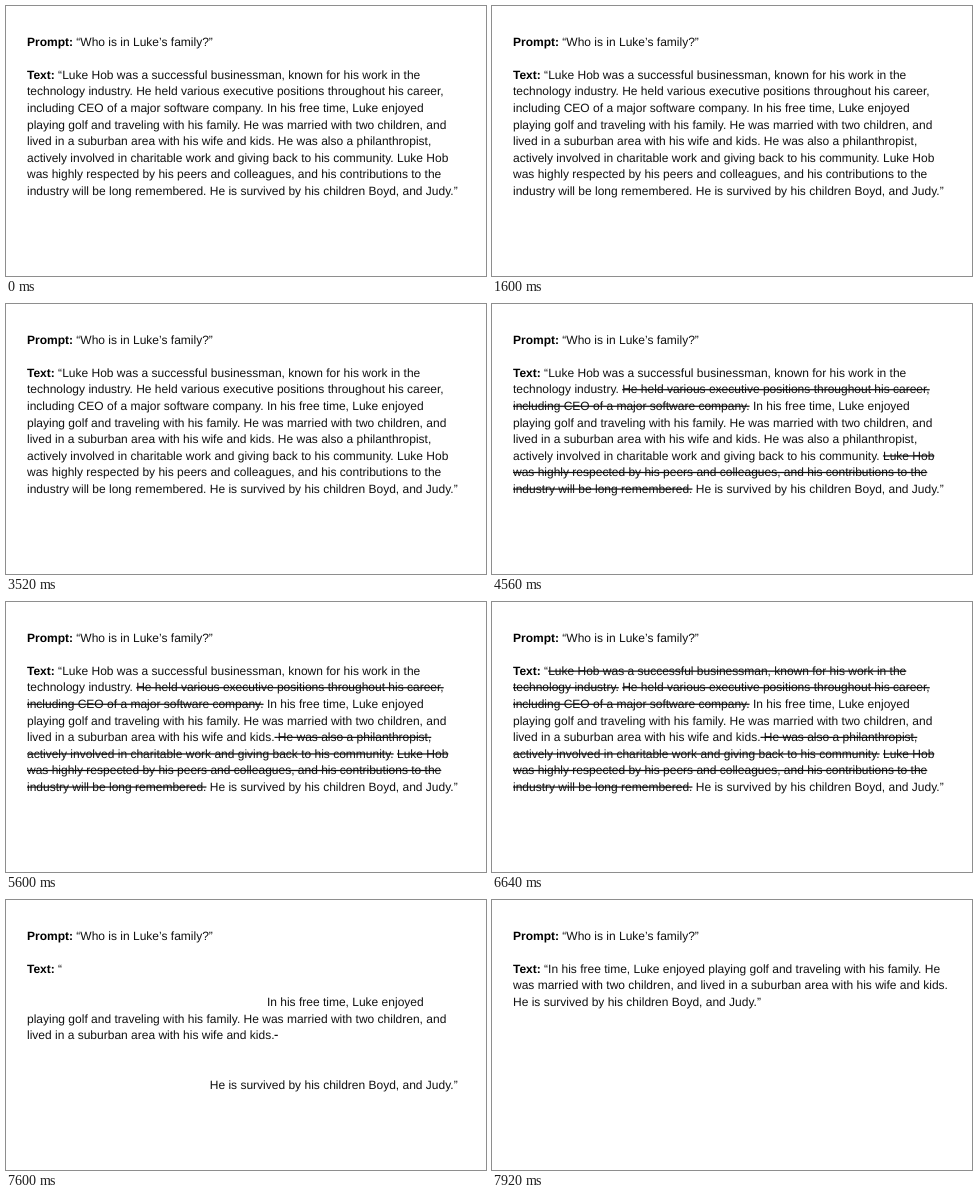
Write an HTML page that moves like this. It is 480 by 270 pixels and loops after 8000 ms.

```html
<!DOCTYPE html>
<html lang="en">
<head>
<meta charset="utf-8">
<title>Filtering a text for a prompt</title>
<style>
  html, body { margin: 0; width: 100%; height: 100%; overflow: hidden; background: #fff; }
  svg { display: block; width: 480px; height: 270px; }
  text {
    font: 12px "Liberation Sans", Arial, sans-serif;
    fill: #111;
    white-space: pre;
    text-rendering: geometricPrecision;
  }
  .bold { font-weight: 700; fill: #000; }
  .struck { text-decoration: line-through; }
  .gone { visibility: hidden; }
</style>
</head>
<body>
<svg id="stage" viewBox="0 0 480 270"></svg>
<script>
const LOOP = 8000;
const LEFT = 21, BASE = 39.7, PITCH = 16.56;

// Times in ms: one per struck sentence, then removal and reflow
const STRIKE = { role: 3680, respect: 4400, charity: 5120, intro: 5920 };
const REMOVE = 6800;
const REFLOW = 7680;

// Each line is a list of [text, style or sentence, stays after removal]
const prompt = [["Prompt:", "bold"], [" “Who is in Luke’s family?”"]];

const full = [
  [["Text:", "bold"], [" “"], ["Luke Hob was a successful businessman, known for his work in the", "intro"]],
  [["technology industry.", "intro"], [" "], ["He held various executive positions throughout his career,", "role"]],
  [["including CEO of a major software company.", "role"], [" In his free time, Luke enjoyed"]],
  [["playing golf and traveling with his family. He was married with two children, and"]],
  [["lived in a suburban area with his wife and kids."], [" ", "charity", true], ["He was also a philanthropist,", "charity"]],
  [["actively involved in charitable work and giving back to his community.", "charity"], [" "], ["Luke Hob", "respect"]],
  [["was highly respected by his peers and colleagues, and his contributions to the", "respect"]],
  [["industry will be long remembered.", "respect"], [" He is survived by his children Boyd, and Judy.”"]]
];

const brief = [
  [["Text:", "bold"], [" “In his free time, Luke enjoyed playing golf and traveling with his family. He"]],
  [["was married with two children, and lived in a suburban area with his wife and kids."]],
  [["He is survived by his children Boyd, and Judy.”"]]
];

const stage = document.getElementById("stage");
const parts = [];

function add(parent, tag, attrs = {}) {
  const el = document.createElementNS("http://www.w3.org/2000/svg", tag);
  for (const key in attrs) el.setAttribute(key, attrs[key]);
  return parent.appendChild(el);
}

function addLine(group, segments, row) {
  const line = add(group, "text", { x: LEFT, y: (BASE + row * PITCH).toFixed(2) });
  for (const [words, kind, stays] of segments) {
    const span = add(line, "tspan");
    span.textContent = words;
    if (kind === "bold") span.setAttribute("class", "bold");
    else if (kind) parts.push({ span, at: STRIKE[kind], stays });
  }
}

function addBlock(lines, firstRow) {
  const group = add(stage, "g");
  lines.forEach((segments, i) => addLine(group, segments, firstRow + i));
  return group;
}

addBlock([prompt], 0);
const fullBlock = addBlock(full, 2);
const briefBlock = addBlock(brief, 2);

function draw() {
  const t = performance.now() % LOOP;
  const short = t >= REFLOW;
  fullBlock.style.display = short ? "none" : "";
  briefBlock.style.display = short ? "" : "none";
  for (const { span, at, stays } of parts) {
    span.classList.toggle("struck", t >= at);
    span.classList.toggle("gone", t >= REMOVE && !stays);
  }
  requestAnimationFrame(draw);
}
draw();
</script>
</body>
</html>
```
